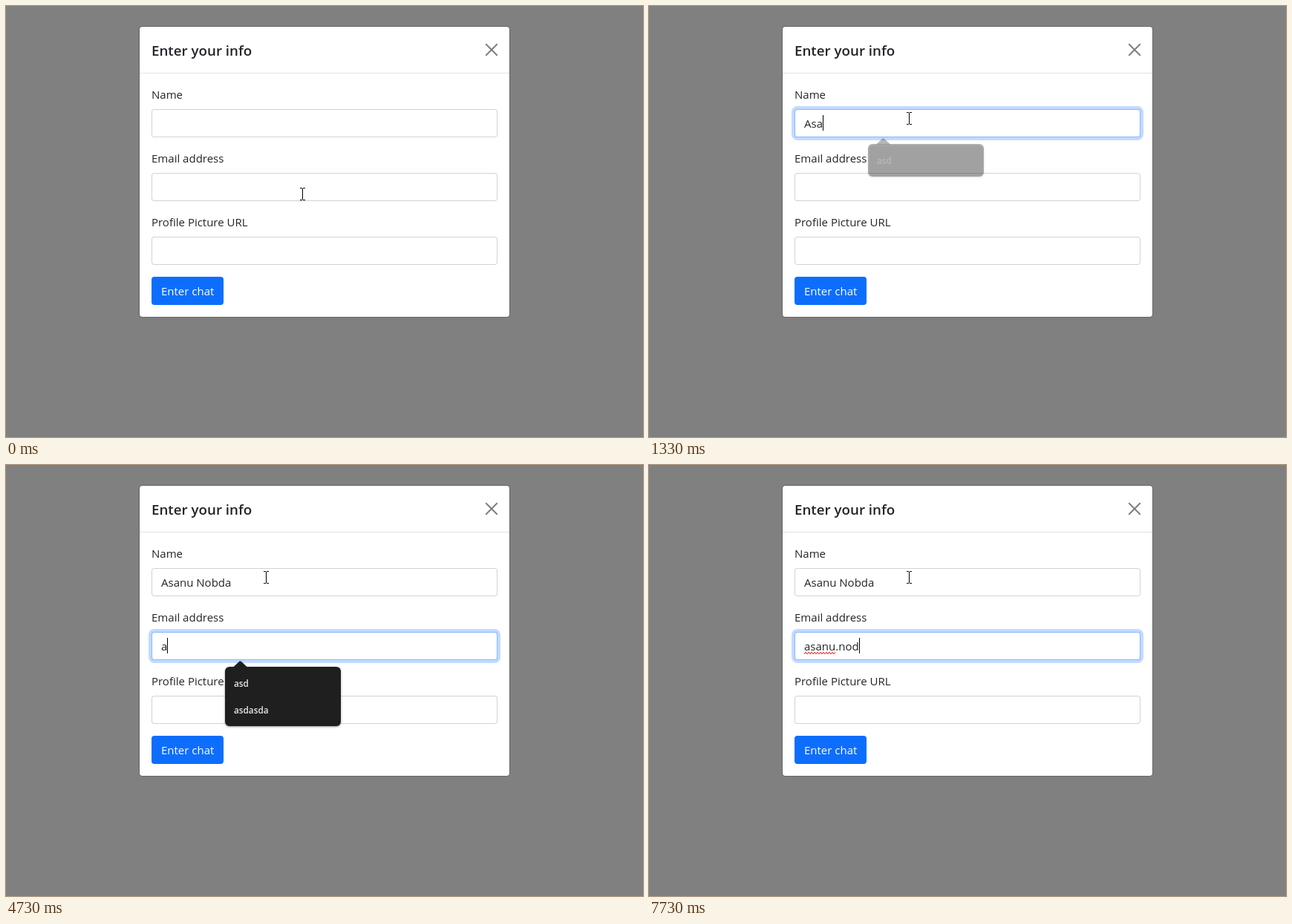
Animation, 858 px wide and 581 px high, one loop 8000 ms. Source, as an HTML page with a canvas:

```html
<!DOCTYPE html>
<html lang="en">
<head>
<meta charset="utf-8">
<title>Enter your info</title>
<style>
html, body { margin: 0; width: 100%; height: 100%; overflow: hidden; background: #808080; }
canvas { display: block; }
</style>
</head>
<body>
<canvas id="stage" width="858" height="581"></canvas>
<script>
const ctx = document.getElementById('stage').getContext('2d');
const LOOP = 8000, RATE = 15 / 1000, BLINK = 530;
const FAMILY = '"Open Sans", "Noto Sans", sans-serif';
const BODY = '15px ' + FAMILY;
const INK = '#212529';
const LEFT = 196, WIDTH = 466, HEIGHT = 38, TEXT_X = 209;

const nameField = { label: 'Name', y: 139, edits: [
  [270, ''], [730, 'A'], [1000, 'As'], [1200, 'Asa'], [1870, 'Asan'],
  [1930, 'Asanu'], [2070, 'Asanu '], [2600, 'Asanu N'], [3130, 'Asanu No'],
  [3200, 'Asanu Nod'], [3530, 'Asanu No'], [3670, 'Asanu Nob'],
  [3930, 'Asanu Nobd'], [4000, 'Asanu Nobda']
] };
const mailField = { label: 'Email address', y: 225, edits: [
  [4200, ''], [4730, 'a'], [4800, 'as'], [4930, 'asa'], [5130, 'asan'],
  [5200, 'asani'], [5470, 'asani.'], [5730, 'asani'], [5870, 'asan'],
  [6000, 'asanu'], [7130, 'asanu.'], [7400, 'asanu.n'],
  [7470, 'asanu.no'], [7730, 'asanu.nod']
] };
const pictureField = { label: 'Profile Picture URL', y: 311, edits: [] };
const pointer = [[0, 399, 253], [70, 375, 205], [130, 350, 164], [270, 350, 151]];

const clamp = v => Math.max(0, Math.min(1, v));
const ease = v => v * v * (3 - 2 * v);
const latest = (list, t) => list.filter(e => e[0] <= t).pop();

function text(str, x, y, font, color) {
  ctx.font = font;
  ctx.fillStyle = color;
  ctx.fillText(str, x, y);
}

function box(x, y, w, h, r, color) {
  ctx.beginPath();
  ctx.roundRect(x, y, w, h, r);
  ctx.fillStyle = color;
  ctx.fill();
}

function path(points, color, width) {
  ctx.beginPath();
  points.forEach(([x, y]) => ctx.lineTo(x, y));
  ctx.strokeStyle = color;
  ctx.lineWidth = width;
  ctx.stroke();
}

function drawDialog() {
  box(0, 0, 858, 581, 0, '#808080');
  box(179, 27, 500, 393, 4.8, '#666');
  box(180, 28, 498, 391, 3.8, '#fff');
  text('Enter your info', LEFT, 67, '600 18.75px ' + FAMILY, INK);
  box(180, 90, 498, 1, 0, '#dee2e6');
  ctx.lineCap = 'round';
  path([[646.8, 51.8], [661.2, 66.2]], '#7f7f7f', 2);
  path([[661.2, 51.8], [646.8, 66.2]], '#7f7f7f', 2);
  ctx.lineCap = 'butt';
  box(LEFT, 365, 97, HEIGHT, 4, '#0d6efd');
  text('Enter chat', TEXT_X, 390, BODY, '#fff');
}

function drawField({ label, y, edits }, focus, t) {
  text(label, LEFT, y - 14, BODY, INK);
  if (focus > 0) {
    const grow = 4 * focus;
    box(LEFT - grow, y - grow, WIDTH + 2 * grow, HEIGHT + 2 * grow, 4 + grow,
      `rgba(13,110,253,${0.25 * focus})`);
  }
  const mix = (a, b) => a + (b - a) * focus;
  box(LEFT, y, WIDTH, HEIGHT, 4, `rgb(${mix(206, 134)},${mix(212, 183)},${mix(218, 254)})`);
  box(LEFT + 1, y + 1, WIDTH - 2, HEIGHT - 2, 3, '#fff');

  const edit = latest(edits, t);
  if (!edit) return;
  text(edit[1], TEXT_X, y + 25, BODY, INK);
  const active = focus > 0 && !(edits === nameField.edits && t >= 4200);
  if (active && (t - edit[0]) % (2 * BLINK) < BLINK) {
    const x = Math.round(TEXT_X + ctx.measureText(edit[1]).width);
    box(x, y + 8, 1, 21, 0, '#000');
  }
}

function drawSquiggle() {
  ctx.font = BODY;
  const points = [], end = TEXT_X + ctx.measureText('asanu').width;
  for (let x = TEXT_X, i = 0; x <= end; x += 2, i++) points.push([x, i % 2 ? 252 : 255]);
  path(points, '#f22', 1);
}

function drawPopup(top, rows, alpha) {
  if (alpha <= 0) return;
  const y = top + 47;
  ctx.save();
  ctx.globalAlpha = alpha;
  ctx.shadowColor = 'rgba(0,0,0,.4)';
  ctx.shadowBlur = 3;
  ctx.shadowOffsetY = 1;
  box(295, y, 156, 8 + 36 * rows.length, 6, '#1f1f1f');
  ctx.shadowColor = 'transparent';
  ctx.beginPath();
  ctx.moveTo(306, y + 0.5);
  ctx.lineTo(314.5, y - 7.5);
  ctx.lineTo(316.5, y - 7.5);
  ctx.lineTo(325, y + 0.5);
  ctx.fill();
  rows.forEach((row, i) => text(row, 307, y + 27 + 36 * i, '600 11.75px ' + FAMILY, '#e8e8e8'));
  ctx.restore();
}

function drawPointer([, x, y]) {
  box(x, y - 7, 1, 15, 0, '#000');
  for (const edge of [y - 8, y + 8]) {
    box(x - 3, edge, 3, 1, 0, '#000');
    box(x + 1, edge, 3, 1, 0, '#000');
  }
}

function draw(ms) {
  const t = Math.floor((ms + 4) * RATE) / RATE + 4;
  const turn = start => ease(clamp((t - start + 46) / 150));
  const toName = t >= 270 ? turn(270) : 0;
  const toMail = t >= 4200 ? turn(4200) : 0;

  drawDialog();
  drawField(nameField, toName - toMail, t);
  drawField(mailField, toMail, t);
  drawField(pictureField, 0, t);
  if (t >= 7200) drawSquiggle();

  const nameAlpha = clamp((t - 404) / 129) * clamp(1 - (t - 1204) / 196);
  drawPopup(nameField.y, t < 730 ? ['asd', 'sdf'] : ['asd'], nameAlpha);
  const mailAlpha = t >= 4730 ? clamp(1 - (t - 4937) / 133) : 0;
  drawPopup(mailField.y, ['asd', 'asdasda'], mailAlpha);
  drawPointer(latest(pointer, t));
}

const start = performance.now();
function tick() {
  draw((performance.now() - start) % LOOP);
  requestAnimationFrame(tick);
}
tick();
</script>
</body>
</html>
```
